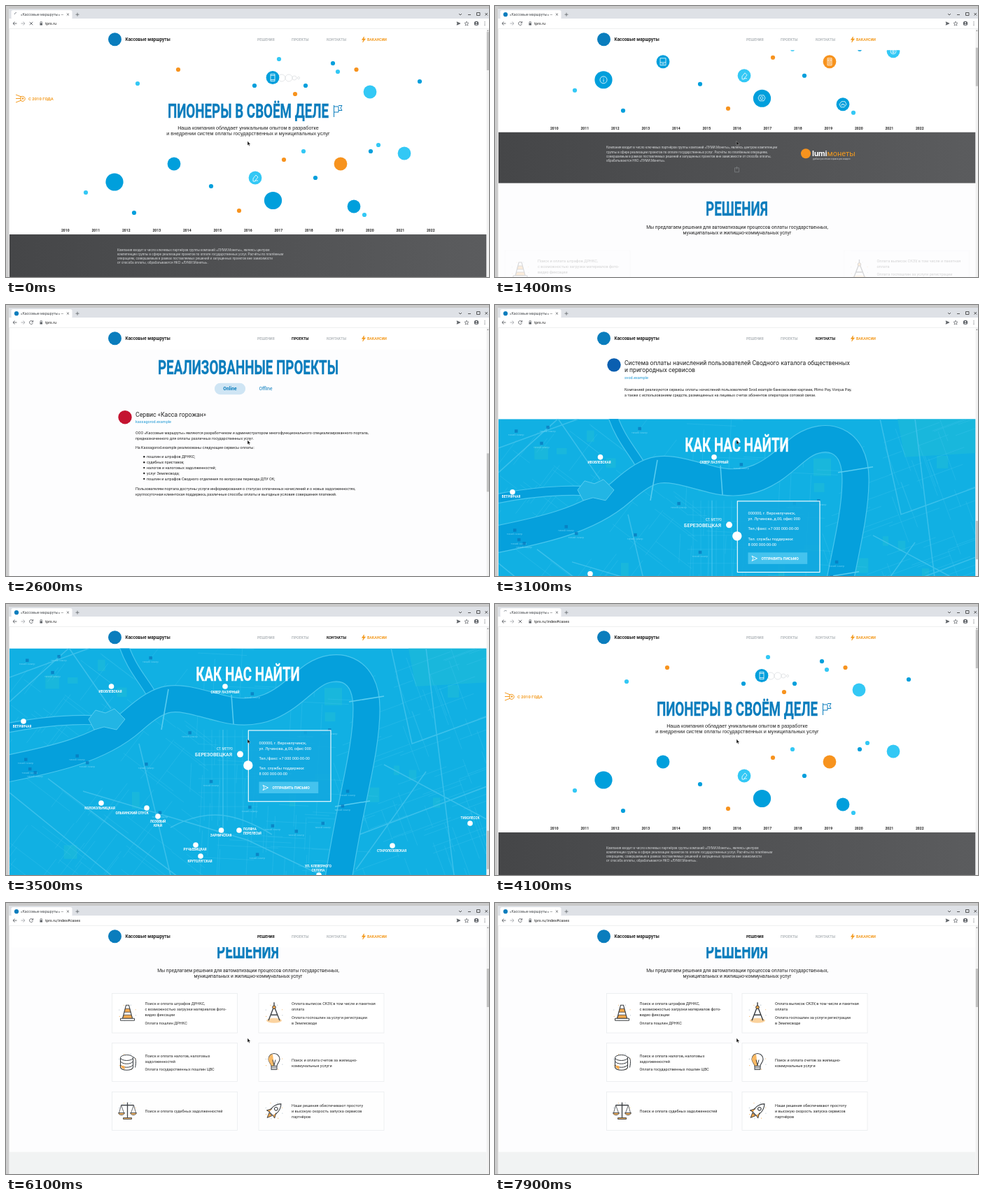
An HTML page for the animation above (8 s loop, 690x388 px).

```html
<!DOCTYPE html>
<html lang="ru">
<head>
<meta charset="utf-8">
<title>Прокрутка сайта</title>
<style>
  html, body { margin: 0; width: 100%; height: 100%; overflow: hidden; background: #fff; }
  svg { display: block; width: 100%; height: 100%; }
  text { font-family: Roboto, "Noto Sans", sans-serif; fill: #222; }
  .arial { font-family: "Liberation Sans", Arial, sans-serif; }
  .bold { font-weight: 700; }
  .mid { text-anchor: middle; }
  .white { fill: #fff; }
  .blue { fill: #0a7dbd; }
  .link { fill: #1d98d4; }
  .orange { fill: #f39a1e; }
  .pale { fill: #d6d8da; }
  .partner { fill: #595c5f; }
  .head { font-weight: 700; font-size: 28px; text-anchor: middle; }
</style>
</head>
<body>
<svg id="stage" viewBox="0 0 690 388"></svg>
<script>
const BLUE = '#009fdc', SKY = '#33c8f5', ORANGE = '#f7931e', DEEP = '#0a7dbd';
const LOOP = 8000, RELOAD = 4000, JUMP = 5300;
const CASES = 367, PROJECTS = 1118, CONTACTS = 1852;

const text = (x, y, size, str, cls = '', extra = '') =>
  `<text x="${x}" y="${y}" font-size="${size}" class="${cls}" ${extra}>${str}</text>`;
const lines = (x, y, size, step, list, cls) =>
  list.map((s, i) => text(x, y + i * step, size, s, cls)).join('');
const circle = (x, y, r, fill, extra = '') => `<circle cx="${x}" cy="${y}" r="${r}" fill="${fill}" ${extra}/>`;
const rect = (x, y, w, h, fill, extra = '') =>
  `<rect x="${x}" y="${y}" width="${w}" height="${h}" fill="${fill}" ${extra}/>`;
const path = (d, stroke, width = 1, fill = 'none', extra = '') =>
  `<path d="${d}" stroke="${stroke}" stroke-width="${width}" fill="${fill}" ${extra}/>`;
const group = (id, body, extra = '') => `<g ${id && `id="${id}"`} ${extra}>${body}</g>`;
const at = (x, y, body) => group('', body, `transform="translate(${x} ${y})"`);
// Condensed display face shared by all headings
const heading = (x, y, str, color) => group('',
  `<text class="head" style="fill:${color};stroke:${color};stroke-width:.3">${str}</text>`,
  `transform="translate(${x} ${y}) scale(.67 1)"`);

let seed = 7;
const random = () => (seed = seed * 16807 % 2147483647) / 2147483647;

function hero() {
  const dots = (color, r, list) => list.map(([x, y]) => circle(x, y, r, color)).join('');
  const icon = (x, y, d) => at(x, y, path(d, '#fff', .8));
  const years = Array.from({ length: 13 }, (_, i) => text(84.8 + 43.5 * i, 323, 5.1, 2010 + i, 'bold mid')).join('');
  const trail = [[394, 5], [404, 5], [412, 3], [418, 1.6]]
    .map(([x, r]) => circle(x, 103, r, 'none', 'stroke="#d8dcdf" stroke-width=".7"')).join('');
  const loaded =
    lines(346, 177, 6.75, 8.3, ['Наша компания обладает уникальным опытом в разработке и внедрении',
      'систем оплаты государственных и муниципальных услуг'], 'mid') +
    lines(159, 350.5, 4.5, 6.3, [
      'Компания входит в число ключевых партнёров группы компаний «ЛУМИ.Монеты», являясь центром компетенции',
      'группы в сфере реализации проектов по оплате государственных услуг. Расчёты по платёжным операциям,',
      'совершаемым в рамках поставляемых решений и запущенных проектов вне зависимости от способа оплаты,',
      'обрабатываются НКО «ЛУМИ.Монеты».'], 'pale') +
    circle(444, 357.5, 7, ORANGE) +
    text(453, 361, 11, 'lumi<tspan class="orange" font-weight="400">монеты</tspan>', 'bold white') +
    text(454, 366, 2.7, 'удобные расчётные сервисы для каждого', 'pale') +
    path('M342.5 378H348.5V384H342.5ZM345.5 376V380', '#85878a', .7) +
    icon(155, 252, 'M-5 0a5 5 0 1 0 10 0a5 5 0 1 0-10 0M0-1V3M0-3V-2') +
    icon(240, 226, 'M-4-5H4V5H-4ZM-4 1H4M-2 3H2') +
    icon(478, 226, 'M-3-5H3V5H-3ZM-2-3H2V-1H-2ZM-2 1H2M-2 3H2') +
    icon(520, 123, 'M0-5L5 0L0 5L-5 0ZM-2 0H2M-1-2H1M-1 2H1') +
    icon(569, 211, 'M-4 0a4 4 0 1 0 8 0a4 4 0 1 0-8 0M-1-2V2H1V-2Z') +
    icon(381, 278, 'M-5 0L-3-4H3L5 0L3 4H-3ZM-2 0a2 2 0 1 0 4 0a2 2 0 1 0-4 0') +
    icon(497, 287, 'M-5 0L-2-4H3L5 0L2 4H-3ZM-3 1H-1L0-1L1 1H3');
  const fallback =
    lines(346, 177, 7.2, 8.3, ['Наша компания обладает уникальным опытом в разработке',
      'и внедрении систем оплаты государственных и муниципальных услуг'], 'arial mid') +
    lines(159, 350.5, 4.67, 6.2, [
      'Компания входит в число ключевых партнёров группы компаний «ЛУМИ.Монеты», являясь центром',
      'компетенции группы в сфере реализации проектов по оплате государственных услуг. Расчёты по платёжным',
      'операциям, совершаемым в рамках поставляемых решений и запущенных проектов вне зависимости',
      'от способа оплаты, обрабатываются НКО «ЛУМИ.Монеты».'], 'arial pale');
  return rect(5, 327, 682, 73, 'url(#band)') + trail +
    dots(ORANGE, 3.1, [[246, 91], [500.5, 91], [413, 126], [397, 220], [333, 293]]) +
    dots(BLUE, 3.1, [[355, 114], [428, 114], [467, 82], [591, 108], [293, 258], [442, 246], [521, 208], [183, 296]]) +
    dots(SKY, 3.1, [[390, 76], [474, 94], [188, 111], [425, 208], [532, 199], [114, 267], [512, 299]]) +
    dots(BLUE, 9.4, [[381, 102.5], [240, 226], [497, 287]]) + dots(BLUE, 12.6, [[155, 252], [381.5, 278.5]]) +
    dots(SKY, 9.4, [[520, 123], [569, 211], [356, 246]]) + circle(478, 226, 9.4, ORANGE) +
    icon(381, 102.5, 'M-3-5H3V5H-3ZM-3-3H3M-3 3H3') +
    icon(356, 246, 'M-3 5V1L1-4L4-1L0 4V5ZM0 4H4') +
    heading(346, 160, 'ПИОНЕРЫ В СВОЁМ ДЕЛЕ', DEEP) +
    path('M468.5 142V159M468.5 144H475V152H468.5M475 142.5H480L478 146L480 149.5H475', DEEP, 1) +
    path('M14 127L22 130M14 132.5H21M14 138L22 135M21 130C25 128 28 131 27 134C26 137 22 137 21 135Z', '#f39a1e', 1) +
    circle(24, 132.5, 1.2, '#f39a1e') + text(32, 134.7, 5.9, 'С 2010 ГОДА', 'bold orange') +
    years + group('fallback', fallback) + group('loaded', loaded);
}

function cases() {
  const ink = '#383c40';
  const sparks = Array.from({ length: 8 }, (_, i) =>
    circle(12.5 * Math.cos(i * .8 + .3), 12 * Math.sin(i * .8 + .3), .6, i % 2 ? '#f5b35c' : '#a9b9c6')).join('');
  const icons = {
    cone: path('M-2-11H2L7 8H-7Z', ink, 1.1, '#fff') + path('M-3-6H3L4.5-1H-4.5ZM-5 3H5.5L7 8H-7Z', ink, .8, '#f7a84a') +
      path('M-10 8H10V11H-10Z', ink, 1, '#fff'),
    compass: `<ellipse cy="11" rx="11" ry="3.5" fill="#fbd29c"/>` +
      path('M-1-7L-8 11M1-7L8 11M-5 3H5M0-15V-10', ink, 1.4) + circle(0, -8, 2.3, '#f7a84a', `stroke="${ink}"`),
    coins: path('M-10-6V8C-8 13 6 13 8 8V-6', ink, 1.1, '#fff') +
      path('M-10-1C-8 4 6 4 8-1M-10 4C-8 9 6 9 8 4M8-7C12-6 13-2 11 8', ink, 1) +
      `<ellipse cx="-1" cy="-6" rx="9" ry="4" fill="#fff" stroke="${ink}"/>` + path('M-9 5V8L-4 11V6Z', 'none', 0, '#f7a84a'),
    bulb: path('M-4 6C-4 2-8 1-8-4A8 8 0 0 1 8-4C8 1 4 2 4 6Z', ink, 1.1, '#fff') +
      path('M-4 6C-4 2-8 1-8-4A8 8 0 0 1-2-11L0 6Z', 'none', 0, '#f9b863') + path('M-4 6H4V11H-4ZM-4 8.5H4M-2-3L0 5L2-3', ink, 1),
    scales: path('M0-12V10M-9-8H9', ink, 1.3) + path('M-9-8L-12 3H-5ZM9-8L5 3H12Z', ink, .8) +
      path('M-13 3H-4C-5 7-12 7-13 3ZM4 3H13C12 7 5 7 4 3ZM-6 10H6V12H-6Z', ink, .9, '#f9b863'),
    rocket: group('', path('M0-14C6-8 6 1 4 6H-4C-6 1-6-8 0-14Z', ink, 1.1, '#fff') +
      path('M-4 0L-8 7L-4 6M4 0L8 7L4 6M-3 7L0 14L3 7Z', ink, .9, '#f7a84a') + circle(0, -4, 2.3, '#fff', `stroke="${ink}"`),
      'transform="rotate(45)"')
  };
  const rows = [[129.5, 56.5], [200.5, 55], [270.5, 55]];
  const card = (x, row, icon, list) => {
    const [y, h] = rows[row];
    return rect(x, y, 179, h, '#fff', 'stroke="#e9ecee" stroke-width=".8"') + at(x + 22, y + h / 2 - .5, sparks + icons[icon]) +
      list.map(([ty, s]) => text(x + 47, ty, 5.5, s)).join('');
  };
  return rect(5, 33, 682, 323.5, '#fdfdfe') + rect(5, 356.5, 682, 80, '#f1f3f3') +
    heading(345.5, 79, 'РЕШЕНИЯ', DEEP) +
    lines(346, 98.5, 6.65, 8, ['Мы предлагаем решения для автоматизации процессов оплаты государственных,',
      'муниципальных и жилищно-коммунальных услуг'], 'mid') +
    group('leftCards',
      card(159.5, 0, 'cone', [[146, 'Поиск и оплата штрафов ДРНКС,'], [154, 'с возможностью загрузки материалов фото-'],
        [162, 'видео фиксации'], [173.5, 'Оплата пошлин ДРНКС']]) +
      card(159.5, 1, 'coins', [[220.5, 'Поиск и оплата налогов, налоговых'], [228.5, 'задолженностей'],
        [240, 'Оплата государственных пошлин ЦВС']]) +
      card(159.5, 2, 'scales', [[300, 'Поиск и оплата судебных задолженностей']])) +
    group('rightCards',
      card(353, 0, 'compass', [[146, 'Оплата выписок СКЗУ, в том числе и пакетная'], [154, 'оплата'],
        [165.5, 'Оплата госпошлин за услуги регистрации'], [173.5, 'в Землесводе']]) +
      card(353, 1, 'bulb', [[226.5, 'Поиск и оплата счетов за жилищно-'], [234.5, 'коммунальные услуги']]) +
      card(353, 2, 'rocket', [[292, 'Наши решения обеспечивают простоту'], [300, 'и высокую скорость запуска сервисов'],
        [308, 'партнёров']]));
}

function projects() {
  const mark = '#595c5f';
  const slides = [0, 1, 2, 3, 4, 5].map(i => circle(320.5 + 10 * i, 67.7, 1.5, i ? '#d3dbe1' : DEEP)).join('');
  const partners = text(32, 138.5, 9, 'ol.test', 'partner bold', 'text-anchor="end"') +
    rect(62, 129, 13, 12, mark) + text(79, 135.5, 6.9, 'Верхнелучинск', 'partner bold') +
    text(79, 141.7, 5.6, 'СЕРВИСЫ', 'partner', 'letter-spacing=".8"') +
    text(163, 140, 13.6, 'Лучевик', 'partner', 'font-weight="500"') +
    rect(250, 123, 10, 18, mark) + text(262, 139.3, 7.6, 'Зарнисвязь', 'partner bold') +
    circle(371.5, 135, 13, '#d0d4d6') + text(335, 138.6, 9.4, 'Плано<tspan font-weight="300">Мер</tspan>', 'partner bold') +
    rect(422, 124, 18, 22, mark) + rect(478, 130, 10, 10, mark) +
    text(491, 139.8, 12.4, 'TUNDREA', 'partner bold', 'font-style="italic"') +
    text(582, 138.8, 9.8, 'KVILO', 'partner bold', 'letter-spacing="4.6"') +
    rect(664, 129, 13, 13, mark) + text(682, 139, 10, 'Н', 'partner bold');
  const services = ['пошлин и штрафов ДРНКС;', 'судебных приставов;', 'налогов и налоговых задолженностей;',
    'услуг Землесвода;', 'пошлин и штрафов Сводного отделения по вопросам переезда ДПУ ОК;'];
  return slides + rect(5, 83.5, 682, 80, '#eff1f2') +
    text(346, 110, 6.6, 'Среди наших партнёров', 'mid', 'style="fill:#bfc5c9"') + partners +
    rect(5, 163.5, 682, 570, '#fdfdfe') + heading(346, 211, 'РЕАЛИЗОВАННЫЕ ПРОЕКТЫ', DEEP) +
    rect(298, 224, 44, 16.5, '#cfe5f4', 'rx="8"') + text(320, 234.7, 6.7, 'Online', 'blue bold mid') +
    text(371, 234.7, 6.7, 'Offline', 'blue mid') +
    circle(170, 273, 9.7, '#c41330') + text(185, 272, 8.7, 'Сервис «Касса горожан»') +
    text(185, 281.3, 5.5, 'kassagorod.example', 'link') +
    lines(185, 297, 5.4, 8, ['ООО «Кассовые маршруты» являются разработчиком и администратором многофункционального специализированного портала,',
      'предназначенного для оплаты различных государственных услуг.']) +
    text(185, 318, 5.4, 'На Kassagorod.example реализованы следующие сервисы оплаты:') +
    lines(201, 331.5, 5.4, 7.9, services) + services.map((_, i) => circle(197.3, 329.6 + 7.9 * i, 1.2, '#222')).join('') +
    lines(185, 377, 5.4, 8, ['Пользователям портала доступны услуги информирования о статусах оплаченных начислений и о новых задолженностях,',
      'круглосуточная клиентская поддержка, различные способы оплаты и выгодные условия совершения платежей.']);
}

function lastProject() {
  return circle(170, 87, 9.7, '#0b5fb0') +
    lines(185, 87, 8.6, 10.6, ['Система оплаты начислений пользователей Сводного каталога общественных', 'и пригородных сервисов']) +
    text(185, 107.3, 5.5, 'svod.example', 'link') +
    lines(185, 123.7, 5.35, 8, ['Компанией реализуются сервисы оплаты начислений пользователей Svod.example банковскими картами, Plimo Pay, Vorqua Pay,',
      'а также с использованием средств, размещенных на лицевых счетах абонентов операторов сотовой связи.']);
}

function map() {
  const road = '#48c6ee', park = '#1fbcd9';
  const river = 'M-10 238C50 226 130 212 180 168S240 132 310 150S410 122 440 102S515 88 515 150S492 280 474 400';
  const branch = 'M175 175C140 160 60 165-10 180M215 145C205 115 180 100 165 50';
  const water = (d, w) => path(d, '#48c6ee', w + 2.4) + path(d, '#05a0dc', w);
  const segment = (x, y, angle, length) =>
    `M${x.toFixed(1)} ${y.toFixed(1)}l${(length * Math.cos(angle)).toFixed(1)} ${(length * Math.sin(angle)).toFixed(1)}`;
  let streets = '', parks = '', places = '';
  for (let i = 0; i < 260; i++) {
    const x = random() * 690, y = 63 + random() * 330;
    const tilt = x < 260 ? .65 : x < 460 ? .05 : -.35;
    streets += segment(x, y, tilt + (i % 2) * Math.PI / 2, 25 + random() * 65);
  }
  for (let i = 0; i < 6; i++) streets += segment(283 + 11 * i, 180, 1.57, 130) + segment(275, 190 + 20 * i, 0, 85);
  for (let i = 0; i < 16; i++)
    parks += rect(random() * 650, 70 + random() * 300, 8 + random() * 16, 8 + random() * 16, park, 'opacity=".6"');
  for (let i = 0; i < 24; i++) {
    const x = 25 + random() * 480, y = 75 + random() * 300;
    places += rect(x, y - 9, 4.5, 4.5, '#0879bd', 'opacity=".75"') + text(x + 2, y, 4, 'тихий сквер', 'mid', 'style="fill:#8adcf6" opacity=".7"');
  }
  const avenues = 'M5 270L150 388M60 250L245 390M110 268L345 338L450 388M190 200L235 388M5 105L120 63M5 140L90 63M90 63L150 150' +
    'M310 180V330M235 320C290 290 330 300 380 330M550 63L580 200L690 160M540 230L690 310M505 330L690 260M500 380L600 240M600 63L640 388';
  const station = (x, y, labelX, labelY, names, anchor = 'mid') =>
    circle(x, y, 3.8, '#fff') + lines(labelX, labelY, 4.6, 6, names, 'bold white ' + anchor);
  const terrain = rect(5, 63.4, 682, 345, '#11b0e3') + parks +
    path('M575 63L690 63V112L585 118ZM455 120H480V145H455Z', 'none', 0, park, 'opacity=".6"') +
    path(streets, road, .6, 'none', 'opacity=".5"') + path(avenues, road, 1.5, 'none', 'opacity=".75"') +
    water(branch, 12) + water(river, 37) +
    path('M118 165L128 152L142 156L155 150L170 165L158 180L140 176L126 180Z', '#5acdf0', 1, '#22b5e4') +
    path('M222 180L232 122M325 172L322 130M490 140L540 132M470 290L520 282', '#5acdf0', 1.5) + places;
  return group('', terrain, 'clip-path="url(#land)"') +
    station(150.5, 118, 149, 127, ['ИВОВЛЕВСКАЯ']) + station(313, 118, 313, 127.5, ['СКВЕР ЛАЗУРНЫЙ']) +
    station(25, 168, 23, 176.5, ['ВЕТРЯНЧАЯ']) + station(136, 285, 134, 293.5, ['КОЛОКОЛЬНИЦКАЯ']) +
    station(201, 292, 180, 300.5, ['ОЛЬХИНСКИЙ СПУСК']) + station(217, 304, 217, 312.5, ['ЛОЗОВЫЙ', 'КРАЙ']) +
    station(307.5, 324, 307, 333, ['ЗАРНИЧСКАЯ']) + station(333, 324, 339, 323.5, ['ПОЛЯНА', 'ПЕРЕЛЕСЬЯ'], '') +
    station(271, 345, 270, 353.3, ['РУЧЬЕВИЦКАЯ']) + station(278, 361, 277, 369.5, ['КРУТОЛУГСКАЯ']) +
    station(663, 314, 663, 308, ['ТИХОЛЕССК']) + station(552, 346, 551, 355, ['СТАРОЛОЗОВСКАЯ']) +
    station(447, 388, 446, 377, ['УЛ. КЛЕВЕРНОГО', 'СКЛОНА']) +
    heading(345.5, 110, 'КАК НАС НАЙТИ', '#fff') +
    text(324, 209, 4.6, 'СТ. МЕТРО', 'white', 'text-anchor="end"') +
    text(323, 218, 7, 'БЕРЕЗОВЕЦКАЯ', 'white', 'text-anchor="end" font-weight="500"') + circle(334.5, 215, 4.5, '#fff') +
    rect(346.3, 181, 117.7, 101.7, '#12a9e0', 'fill-opacity=".85" stroke="#fff" stroke-width="1.1"') +
    circle(345.8, 231, 6.7, '#fff') +
    lines(361.5, 200.5, 5.6, 8, ['000000, г. Верхнелучинск,', 'ул. Лучинова, д.00, офис 000'], 'white') +
    text(361.5, 222.5, 5.6, 'Тел./факс: +7 000 000-00-00', 'white') +
    lines(361.5, 237, 5.6, 8, ['Тел. службы поддержки:', '8 000 000-00-00'], 'white') +
    rect(361.5, 254.5, 84.7, 16.5, '#45c3ee') + path('M367 259.5L374.5 263L367 266.5L369 263Z', '#fff', .9) +
    text(380.5, 265, 5.2, 'ОТПРАВИТЬ ПИСЬМО', 'bold white');
}

function browser() {
  const gray = '#5f6368';
  const nav = [[359, 'РЕШЕНИЯ'], [408, 'ПРОЕКТЫ'], [458, 'КОНТАКТЫ']]
    .map(([x, s]) => text(x, 49.9, 5.2, s, 'bold nav')).join('');
  return rect(0, 0, 690, 4, '#c9c9c9') + rect(0, 0, 4.5, 388, '#cdcdcd') +
    rect(4.5, 4, 685.5, 14.5, '#dee1e6') + rect(7.5, 6, 87, 13, '#fff', 'rx="2.5"') + rect(4.5, 18, 685.5, 15, '#fff') +
    rect(4.5, 32.4, 685.5, .5, '#dcdee0') +
    group('favicon', circle(15, 12.2, 3.1, DEEP)) + group('spinner', path('M15 9.4A2.8 2.8 0 0 1 17.8 12.2', '#8a9097', .9)) +
    text(21, 14, 5.2, '«Кассовые маршруты» —', '', 'style="fill:#45494d"') +
    path('M86.8 10.5L90 13.7M90 10.5L86.8 13.7M99.5 12.2H104.5M102 9.7V14.7', gray, .8) +
    path('M647 11L649 13L651 11M660 12.5H664M672.5 9.5H677V13.5H672.5ZM684.5 10L688 13.5M688 10L684.5 13.5', '#333', .8) +
    path('M15.5 25H10M12.5 22.5L10 25L12.5 27.5', gray, .9) + path('M21.5 25H27M24.5 22.5L27 25L24.5 27.5', '#a9acb0', .9) +
    group('reload', path('M38.2 23.7A2.5 2.5 0 1 0 38.4 25.8M38.6 22V24.2H36.4', gray, .9)) +
    group('stop', path('M33.8 22.8L38.2 27.2M38.2 22.8L33.8 27.2', gray, .9)) +
    rect(48.4, 24.5, 3.6, 3, gray) + path('M49 24.5V22.7H51.4V24.5', gray, .7) + text(56, 27, 5.6, '', '', 'id="url"') +
    path('M644 22.8L649 25L644 27.2L645 25Z', gray, .8, gray) +
    path('M658 22L658.9 24.1L661 24.3L659.4 25.7L659.9 28L658 26.8L656.1 28L656.6 25.7L655 24.3L657.1 24.1Z', gray, .7) +
    circle(672, 25, 3.2, '#5f6368') + circle(672, 24, 1, '#fff') + path('M670 27.2C671 25.5 673 25.5 674 27.2Z', 'none', 0, '#fff') +
    [22.8, 25, 27.2].map(y => circle(684, y, .6, gray)).join('') +
    rect(5, 33, 682, 30.2, '#fff') + circle(155.5, 47.7, 9.5, DEEP) +
    text(170.5, 50, 6.4, 'Кассовые маршруты', 'bold') + nav +
    path('M511.5 44L508.5 48.5H511L509.5 52L513.5 47H510.8Z', '#f39a1e', .7, '#f39a1e') + text(516, 49.9, 5.2, 'ВАКАНСИИ', 'bold orange') +
    rect(686.5, 33, 3.5, 355, '#f1f1f1') + path('M687.2 36L688.3 34.5L689.4 36Z', 'none', 0, '#777') +
    rect(686.8, 37, 3.2, 55, '#c1c1c1', 'id="thumb"');
}

const stage = document.getElementById('stage');
stage.innerHTML = `<defs>
  <linearGradient id="band"><stop stop-color="#454648"/><stop offset=".5" stop-color="#505153"/><stop offset="1" stop-color="#5b5c5e"/></linearGradient>
  <clipPath id="view">${rect(5, 33, 681.5, 355, '#000')}</clipPath>
  <clipPath id="land">${rect(5, 63.4, 682, 345, '#000')}</clipPath></defs>` +
  rect(0, 0, 690, 388, '#fff') +
  group('', group('page', hero() + at(0, CASES, cases()) + at(0, 1017, projects()) + at(0, 1751, lastProject()) +
    at(0, CONTACTS, map())), 'clip-path="url(#view)"') +
  browser() +
  path('M345 193.5v6l1.4-1.3 1 2.2 .9-.4-1-2.1h1.9z', '#fff', .3, '#111');

const $ = id => document.getElementById(id);
const navItems = [...document.querySelectorAll('.nav')];
const show = (id, visible) => $(id).setAttribute('visibility', visible ? 'visible' : 'hidden');
const move = (id, x, y) => $(id).setAttribute('transform', `translate(${x.toFixed(2)} ${y.toFixed(2)})`);
const progress = (t, start, length) => Math.min(1, Math.max(0, (t - start) / length));
const inOut = p => p < .5 ? 4 * p ** 3 : 1 - 4 * (1 - p) ** 3;

// Same curve as the CSS "ease" keyword
function ease(x) {
  const bezier = (a, b, s) => 3 * (1 - s) ** 2 * s * a + 3 * (1 - s) * s * s * b + s ** 3;
  let low = 0, high = 1;
  for (let i = 0; i < 20; i++) {
    const s = (low + high) / 2;
    if (bezier(.25, .25, s) < x) low = s; else high = s;
  }
  return bezier(.1, 1, low);
}

function scrollAt(t) {
  if (t >= RELOAD) return t < JUMP ? 0 : CASES;
  return PROJECTS * inOut(progress(t, 1000, 1254)) + (CONTACTS - PROJECTS) * inOut(progress(t, 2450, 963));
}

function draw(now) {
  const t = now % LOOP, scroll = scrollAt(t);
  const loading = t < 900 || (t >= RELOAD && t < JUMP);
  const loaded = (t >= 300 && t < RELOAD) || t >= 4300;
  move('page', 0, -scroll);
  $('thumb').setAttribute('y', 37 + scroll * 351 / 2260);

  const entered = ease(progress(t, t < RELOAD ? 1250 : 5365, 1000)), offset = 179 * (1 - entered);
  move('leftCards', -offset, 0);
  move('rightCards', offset, 0);
  $('leftCards').style.opacity = $('rightCards').style.opacity = entered;

  const active = [300, 900, 1700].filter(edge => scroll > edge).length - 1;
  navItems.forEach((item, i) => item.style.fill = i === active ? '#111' : '#b4b9bd');

  show('loaded', loaded);
  show('fallback', !loaded);
  show('favicon', !loading);
  show('spinner', loading);
  show('stop', loading);
  show('reload', !loading);
  $('spinner').setAttribute('transform', `rotate(${(t * .36 - 90) % 360} 15 12.2)`);
  $('url').textContent = t < RELOAD ? 'tprs.ru' : 'tprs.ru/index#cases';
}

function tick() {
  draw(performance.now());
  requestAnimationFrame(tick);
}
tick();
</script>
</body>
</html>
```
